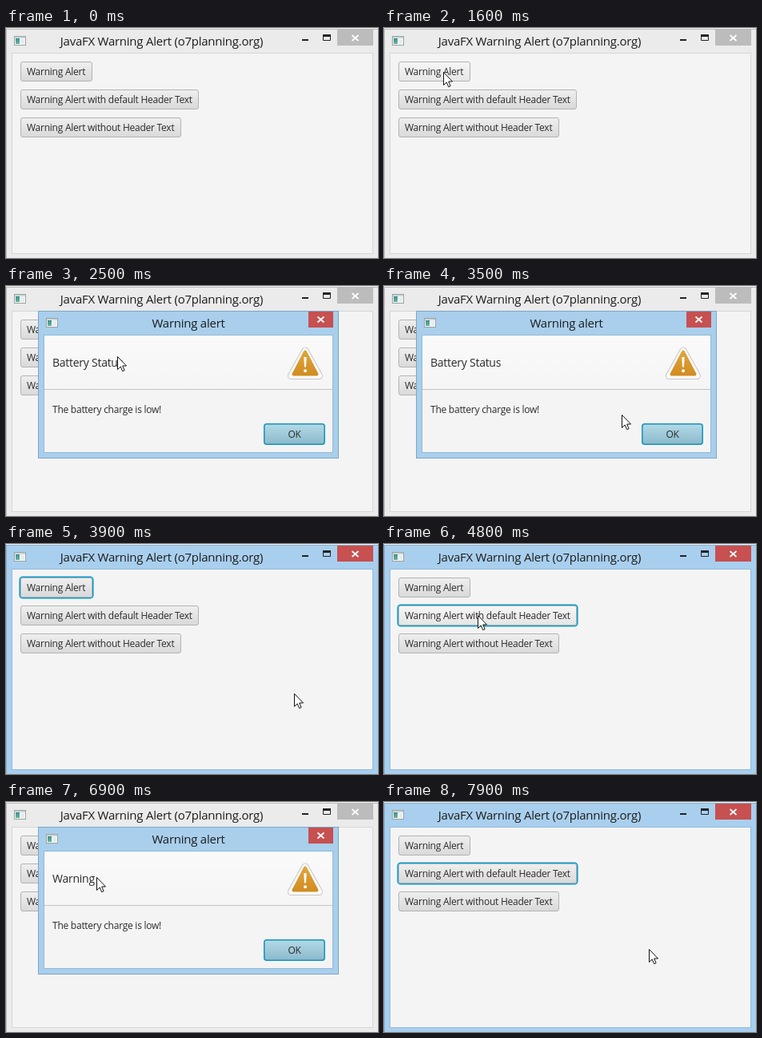
Animation, 465 px wide and 288 px high, one loop 8 s. Source, as an HTML page:

```html
<!DOCTYPE html>
<html lang="en">
<head>
<meta charset="utf-8">
<title>Warning Alert</title>
<style>
html, body { margin: 0; width: 100%; height: 100%; overflow: hidden; background: #ebebeb; }
svg { display: block; width: 100vw; height: 100vh; }
text { font-family: "Open Sans", "Noto Sans", sans-serif; font-size: 12px; letter-spacing: -.25px; fill: #2b2b2b; }
.title { font-size: 15px; fill: #1c1c1c; text-anchor: middle; }
.head { font-size: 14px; }
</style>
</head>
<body>
<svg id="stage" viewBox="0 0 465 288" xmlns="http://www.w3.org/2000/svg"></svg>
<script>
const LOOP = 8000, STEP = 100;
const BUTTONS = [
  { y: 42, w: 90, label: "Warning Alert" },
  { y: 77, w: 223, label: "Warning Alert with default Header Text" },
  { y: 112, w: 201, label: "Warning Alert without Header Text" }
];
const DIALOGS = [
  { open: 1900, close: 3900, head: "Battery Status" },
  { open: 5300, close: 7900, head: "Warning" }
];
// time, x, y of the pointer tip
const PATH = [
  [400, 405, 30], [1000, 51, 56], [1300, 73, 55], [1900, 73, 55], [2100, 80, 56],
  [2500, 138, 88], [3000, 161, 104], [3800, 359, 187], [3900, 359, 187],
  [4600, 116, 89], [5400, 116, 89], [6200, 330, 181],
  [6600, 89, 100], [6900, 112, 94], [7100, 99, 97], [7500, 335, 198],
  [7800, 330, 184], [8000, 330, 184]
];

const rect = (x, y, w, h, fill, extra = "") =>
  `<rect x="${x}" y="${y}" width="${w}" height="${h}" fill="${fill}" ${extra}/>`;
const text = (x, y, s, extra = "") => `<text x="${x}" y="${y}" ${extra}>${s}</text>`;
const gradient = (id, top, bottom) =>
  `<linearGradient id="${id}" x2="0" y2="1"><stop stop-color="${top}"/><stop offset="1" stop-color="${bottom}"/></linearGradient>`;
const cross = (x, y) =>
  `<path d="M${x - 4} ${y - 3.5}l8 7m0-7l-8 7" stroke="#fff" stroke-width="1.7" fill="none"/>`;
const icon = (x, y) =>
  rect(x + .5, y + .5, 14, 11, "#f6f8f8", 'stroke="#98a3a3"') +
  rect(x + 1, y + 1, 13, 2, "#cdd6d8") +
  rect(x + 2, y + 3, 5, 7, "url(#teal)") +
  rect(x + 9, y + 4, 4, 6, "#e6ecec");

const button = (b, i) =>
  `<g id="btn${i}">` +
  rect(17.3, b.y - .7, b.w + 1.4, 26.4, "none", 'class="ring" rx="3.5" stroke="#0b9bcd" stroke-width="1.7"') +
  rect(18.5, b.y + .5, b.w - 1, 24, "url(#plain)", 'class="face" rx="2.5" stroke="#b3b3b3"') +
  text(26, b.y + 17, b.label) + "</g>";

const warningIcon =
  `<g stroke-linejoin="round">
    <path d="M374 81L391.500 112.500H356.500Z" fill="#c6c6c6" stroke="#c6c6c6" stroke-width="9"/>
    <path d="M374 81L391.500 112.500H356.500Z" fill="#fcfcfc" stroke="#fcfcfc" stroke-width="7"/>
    <path d="M374 82.500L388.500 110.500H359.500Z" fill="url(#amber)" stroke="url(#amber)" stroke-width="4"/>
    <path d="M372.300 89h3.400l-.7 12.500h-2z" fill="#fff"/>
    <circle cx="374" cy="106.300" r="2" fill="#fff"/>
  </g>`;

document.getElementById("stage").innerHTML =
  "<defs>" +
  gradient("plain", "#efefef", "#d9d9d9") +
  gradient("hover", "#f6f6f6", "#e5e5e5") +
  gradient("ok", "#b3d9e6", "#8bbacc") +
  gradient("okHover", "#c5e6f0", "#9fcbda") +
  gradient("amber", "#e0a43c", "#d18e22") +
  gradient("header", "#fafafa", "#f5f5f5") +
  gradient("teal", "#3f8f94", "#6fb59a") +
  "</defs>" +
  rect(0, 0, 465, 2, "#f4f4f4") +
  rect(.5, 1.5, 466, 290, "#ebebeb", 'id="frame" stroke="#b8b8b8"') +
  rect(7.5, 31.5, 451, 251, "#f4f4f4", 'id="pane" stroke="#d6d6d6"') +
  icon(10, 10) +
  text(194.5, 22, "JavaFX Warning Alert (o7planning.org)", 'class="title"') +
  rect(370, 14, 8, 2, "#222") +
  `<path d="M396.500 9.500h9v6h-9z" fill="none" stroke="#222"/>` + rect(396, 8, 10, 3, "#222") +
  rect(414, 2, 45, 20, "#bcbcbc", 'id="close"') + cross(436.5, 12.5) +
  BUTTONS.map(button).join("") +
  `<g id="dialog">` +
  rect(40.5, 31.5, 375, 184, "#a9cfec", 'stroke="#7ea6c6"') +
  rect(47.5, 61.5, 361, 147, "#f4f4f4", 'stroke="#92b9d6"') +
  rect(48, 62, 360, 67, "url(#header)") +
  rect(48, 129, 360, 1, "#c4c4c4") +
  icon(50, 40) +
  text(228, 52, "Warning alert", 'class="title"') +
  rect(378, 32, 31, 20, "#c75050") + cross(393.5, 42) +
  text(58, 101, "", 'id="head" class="head"') + warningIcon +
  text(58, 159, "The battery charge is low!") +
  rect(322.8, 172.8, 75.4, 25.4, "url(#ok)", 'id="okFace" rx="3" stroke="#1593b8" stroke-width="1.5"') +
  text(360.5, 190, "OK", 'text-anchor="middle"') +
  "</g>" +
  `<path id="pointer" d="M1.500 .5V16.500L5.200 13L7.700 18.700L10.100 17.600L7.700 12H12.500Z" fill="#fff" stroke="#111" stroke-linejoin="round"/>`;

const $ = id => document.getElementById(id);
const set = (el, attrs) => { for (const k in attrs) el.setAttribute(k, attrs[k]); };
const inside = (p, x, y, w, h) => p[0] >= x && p[0] <= x + w && p[1] >= y && p[1] <= y + h;

function pointerAt(t) {
  let i = 0;
  while (i < PATH.length - 2 && t >= PATH[i + 1][0]) i++;
  const [t0, x0, y0] = PATH[i], [t1, x1, y1] = PATH[i + 1];
  const u = Math.max(0, Math.min(1, (t - t0) / (t1 - t0)));
  const k = u * u * (3 - 2 * u);
  return [x0 + (x1 - x0) * k, y0 + (y1 - y0) * k];
}

function draw(time) {
  const t = Math.floor(time / STEP) * STEP;
  const p = pointerAt(t), shown = t >= 400;
  const box = DIALOGS.find(d => t >= d.open && t < d.close);
  const modal = DIALOGS.some(d => t >= d.open - 100 && t < d.close);
  const active = t >= 1700 && !modal;
  const focus = t >= 4800 ? 1 : 0;

  set($("frame"), { fill: active ? "#a9cfee" : "#ebebeb", stroke: active ? "#86aecd" : "#b8b8b8" });
  set($("pane"), { stroke: active ? "#93bad8" : "#d6d6d6" });
  set($("close"), { fill: active ? "#c75050" : "#bcbcbc" });

  BUTTONS.forEach((b, i) => {
    const el = $("btn" + i), over = shown && !modal && inside(p, 18, b.y, b.w, 25);
    set(el.querySelector(".face"), { fill: over ? "url(#hover)" : "url(#plain)" });
    set(el.querySelector(".ring"), { visibility: active && focus === i ? "visible" : "hidden" });
  });

  set($("dialog"), { visibility: box ? "visible" : "hidden" });
  if (box) {
    // fades in while growing and settling towards its place
    const age = t - box.open;
    const a = age < 100 ? .4 : age < 200 ? .87 : 1;
    const s = .9 + .1 * a, shift = 5 * (1 - a);
    set($("dialog"), {
      opacity: a,
      transform: `translate(${228 - shift} ${123 - shift}) scale(${s}) translate(-228 -123)`
    });
    $("head").textContent = box.head;
    set($("okFace"), { fill: inside(p, 322, 172, 77, 27) ? "url(#okHover)" : "url(#ok)" });
  }
  set($("pointer"), {
    visibility: shown ? "visible" : "hidden",
    transform: `translate(${Math.round(p[0])} ${Math.round(p[1])})`
  });
}

const start = performance.now();
function tick(now) {
  draw(Math.max(0, now - start) % LOOP);
  requestAnimationFrame(tick);
}
draw(0);
requestAnimationFrame(tick);
</script>
</body>
</html>
```
